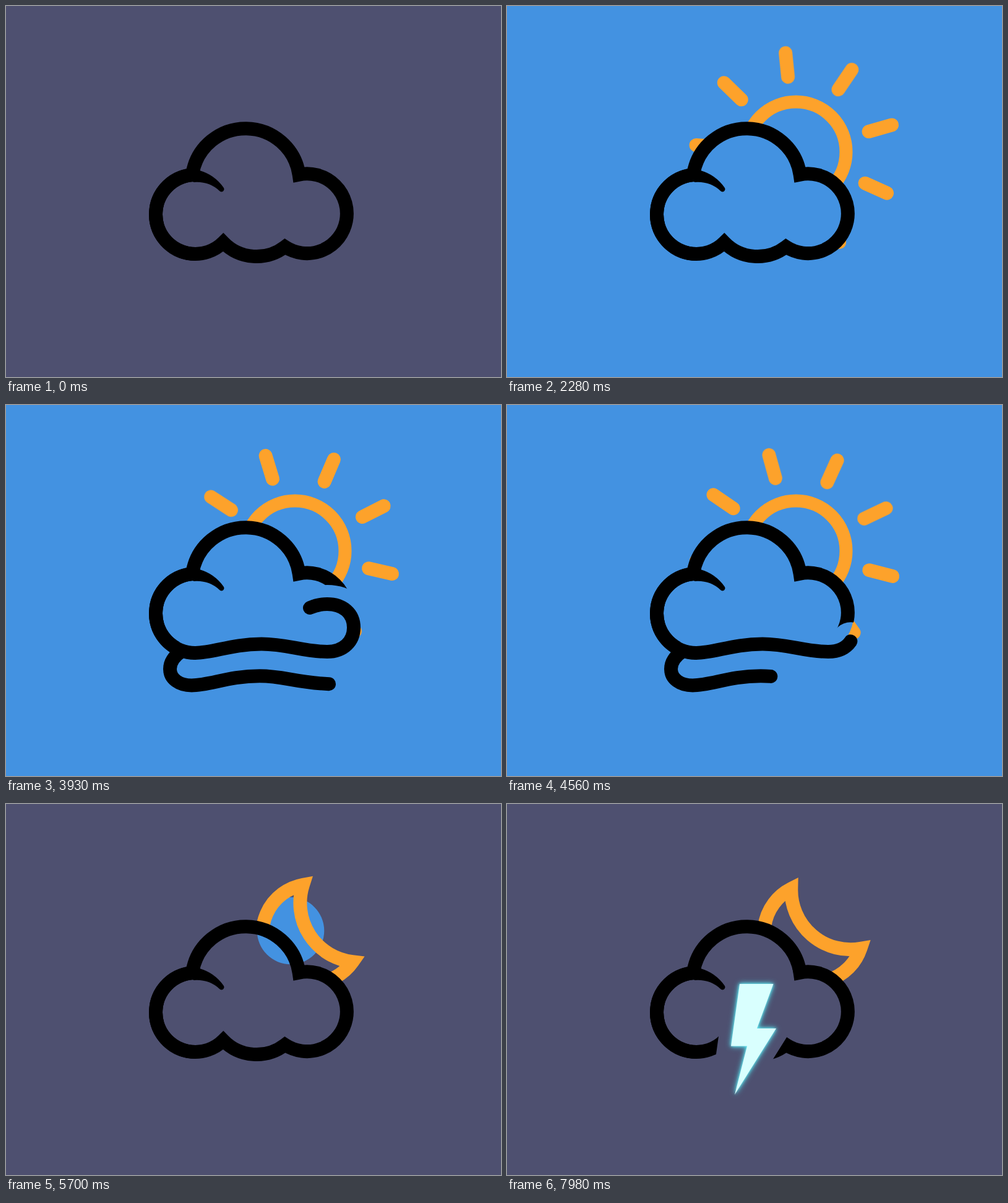
Recreate the animation shown at these times as an HTML page. Size 800 by 600 pixels, loop 8 s.

```html
<!DOCTYPE html>
<html lang="en">
<head>
<meta charset="utf-8">
<title>Weather</title>
<style>
  html, body { margin: 0; width: 100%; height: 100%; overflow: hidden; background: #4e5070; }
  svg { display: block; width: 100vw; height: 100vh; }
  #glow { filter: drop-shadow(0 0 2px #6deef5) drop-shadow(0 0 4px #4fd8e6); }
</style>
</head>
<body>
<svg viewBox="0 0 800 600" fill="none">
  <defs>
    <path id="cloud" d="M306 273A64 64 0 1 0 351.2 382.3A75 75 0 0 0 450.9 389.4A64.4 64.4 0 1 0 473.6 272.6A87.2 87.2 0 0 0 301.5 270"/>
    <path id="wind" pathLength="1" d="M306 401C335 401 365 386.5 413 386.5C455 386.5 480 399 519 399C546 399 562 382 562 360C562 337 545 322 519 322C508 322 500 324 491 328"/>
    <g id="drops"></g>
    <path id="bolt" d="M376 291H430.5L404 363H435L368 470L388 391.5H362Z"/>
    <mask id="behindCloud" maskUnits="userSpaceOnUse" x="0" y="0" width="800" height="600">
      <path d="M0 0H800V600H0Z" fill="#fff"/>
      <use href="#cloud" fill="#000" stroke="#000" stroke-width="20"/>
      <path d="M306 337H485V410H306Z" fill="#000"/>
    </mask>
    <mask id="gaps" maskUnits="userSpaceOnUse" x="0" y="0" width="800" height="600">
      <path d="M0 0H800V600H0Z" fill="#fff"/>
      <g stroke="#000" stroke-linecap="round">
        <use href="#wind" stroke-width="62"/>
        <use href="#drops" stroke-width="44"/>
        <use href="#bolt" fill="#000" stroke-width="44"/>
      </g>
    </mask>
  </defs>

  <rect width="800" height="600" fill="#4e5070"/>
  <circle id="day" cx="460" cy="205" fill="#4392e1"/>

  <g mask="url(#behindCloud)" stroke="#fda22b" stroke-width="22">
    <g id="sun" stroke-linecap="round">
      <path id="ring" pathLength="360" stroke-width="21" d="M0 81A81 81 0 1 1 0 -81A81 81 0 1 1 0 81"/>
      <g id="rays"></g>
    </g>
    <path id="moon" stroke-miterlimit="10"/>
  </g>

  <g stroke="#000" stroke-width="22">
    <path id="tail" pathLength="1" stroke-linecap="round" d="M284 398C272 406 265 416 265 427C265 443 280 453.5 300 453.5C330 453.5 360 438.3 410 438.3C450 438.3 465 448.5 522 451.2"/>
    <use href="#cloud" mask="url(#gaps)"/>
    <path d="M306 273A64 64 0 0 0 306 401"/>
    <use href="#wind" stroke-linecap="round"/>
  </g>
  <path fill="#000" d="M300 263L313 266Q337 273 351.5 293.5A4.2 4.2 0 0 1 345 299Q328 283 303 285Z"/>
  <use href="#drops" stroke="#48a1e6" stroke-width="15" stroke-linecap="round"/>
  <g id="glow"><use href="#bolt" fill="#d9fffe"/></g>
</svg>

<script>
const $ = id => document.getElementById(id);
const set = (el, attrs) => { for (const k in attrs) el.setAttribute(k, attrs[k]); };
const show = (el, visible) => set(el, { display: visible ? 'inline' : 'none' });
const clamp = (v, lo = 0, hi = 1) => Math.min(hi, Math.max(lo, v));
const span = (t, from, to) => clamp((t - from) / (to - from));
const easeOut = u => 1 - (1 - u) ** 3;
const easeInOut = u => u < .5 ? 2 * u * u : 1 - 2 * (1 - u) ** 2;

function addLines(parent, count) {
  return Array.from({ length: count }, () =>
    parent.appendChild(document.createElementNS(parent.namespaceURI, 'line')));
}

const LOOP = 8000;
const rays = addLines($('rays'), 9);
rays.forEach((ray, i) => set(ray, { x1: 122.5, transform: `rotate(${10 + i * 40})` }));

// x is measured at y = 428; born is the start of the latest fall
const lanes = [
  { x: 370.5, born: 6428 }, { x: 415.5, born: 6352 },
  { x: 459, born: 6466 }, { x: 326, born: 6144 }
];
const drops = addLines($('drops'), lanes.length);

// Crescent around its own centre, opening to the right
const half = 67.7 * Math.PI / 180;
const hornX = 80 * Math.cos(half), hornY = 80 * Math.sin(half);
set($('moon'), { d: `M${hornX} ${-hornY}A80 80 0 1 0 ${hornX} ${hornY}A96 96 0 0 1 ${hornX} ${-hornY}Z` });

function dash(el, length, total) {
  show(el, length > 0);
  set(el, { 'stroke-dasharray': length >= total ? 'none' : `${length} ${2 * total}` });
}

function drawSky(t) {
  const radius = t < 3000 ? 1.494 * (t - 375) : 640 * (1 - span(t, 5280, 5740));
  set($('day'), { r: clamp(radius, 0, 640) });
}

function drawSun(t) {
  const sink = 75 * span(t, 5040, 5379) ** 3;
  show($('sun'), t > 395 && t < 5379);
  set($('sun'), { transform: `translate(${467 - sink} ${236 + sink})` });
  dash($('ring'), clamp(.73 * (t - 395), 0, 360), 360);

  const grown = easeOut(span(t, 945, 1400)) * (1 - easeInOut(span(t, 4720, 5040)));
  const spin = 10.53 * Math.max(0, t / 1000 - 1.123) ** 2;
  show($('rays'), grown > 0);
  set($('rays'), { transform: `translate(-.3 .6) rotate(${spin})` });
  rays.forEach(ray => set(ray, { x2: 122.5 + 39 * grown }));
}

function drawMoon(t) {
  const hidden = 1 - easeOut(span(t, 5380, 5790));
  const angle = -39.7 - .0072 * (t - 6660);
  show($('moon'), t > 5380);
  set($('moon'), { transform: `translate(${495.5 - 100 * hidden} ${208.5 + 95 * hidden}) rotate(${angle})` });
}

function drawWind(t) {
  const back = 1 - easeInOut(span(t, 4300, 4960));
  dash($('wind'), easeInOut(span(t, 2500, 3200)) * back, 1);
  dash($('tail'), easeInOut(span(t, 3150, 3850)) * back, 1);
}

function drawRain(t) {
  lanes.forEach(({ x, born }, i) => {
    const earlier = born - 520;
    const start = t < born && earlier > 5800 ? earlier : born;
    const fall = (t - start) * .25;
    const head = clamp(400 + fall, 400, 495);
    const tip = clamp(400 + fall - 29.5, 400, 495);
    const at = y => x + (y - 428) * .373;
    show(drops[i], fall > 0 && fall < 124.5);
    set(drops[i], { x1: at(tip), y1: tip, x2: at(head), y2: head });
  });
}

function drawBolt(t) {
  const size = easeOut(span(t, 7050, 7350));
  show($('bolt'), size > 0);
  set($('bolt'), { transform: `translate(403 291) scale(${size}) translate(-403 -291)` });
  set($('glow'), { opacity: .94 + .06 * Math.cos((t - 7980) / 45) });
}

const begin = performance.now();
function frame() {
  const t = (performance.now() - begin) % LOOP;
  for (const draw of [drawSky, drawSun, drawMoon, drawWind, drawRain, drawBolt]) draw(t);
  requestAnimationFrame(frame);
}
frame();
</script>
</body>
</html>
```
